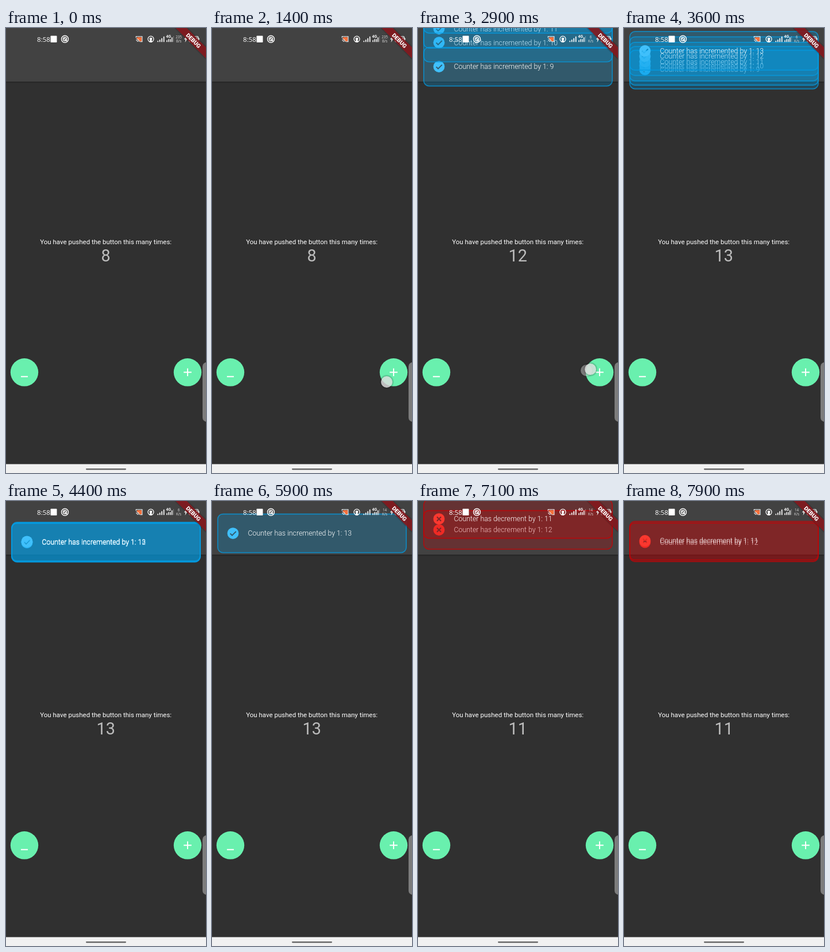
An HTML page for the animation above (8 s loop, 348 by 772 pixels).

```html
<!DOCTYPE html>
<html lang="en">
<head>
<meta charset="utf-8">
<title>Counter</title>
<style>
html, body { margin: 0; width: 100%; height: 100%; overflow: hidden; background: #303030; }
svg { display: block; width: 348px; height: 772px; font-family: Roboto, sans-serif; }
.line { fill: none; stroke: #fff; }
.up { --fill: #039be2; --icon: #40c0fb; }
.down { --fill: #c90004; --icon: #fb382f; }
.box { fill: var(--fill); fill-opacity: .25; stroke: var(--fill); stroke-opacity: .75; stroke-width: 1.7; }
.icon { fill: var(--icon); }
.msg { fill: #fff; font-size: 12.3px; font-weight: 300; }
.net { font: 6.2px "Open Sans", sans-serif; fill: #ddd; text-anchor: middle; }
</style>
</head>
<body>
<svg viewBox="0 0 348 772">
  <defs>
    <linearGradient id="shade" x2="0" y2="1">
      <stop stop-color="#000" stop-opacity=".3"/><stop offset="1" stop-color="#000" stop-opacity="0"/>
    </linearGradient>
    <radialGradient id="halo">
      <stop offset=".7" stop-color="#000" stop-opacity=".3"/><stop offset="1" stop-color="#000" stop-opacity="0"/>
    </radialGradient>
    <!-- glyphs are cut out so the layers below show through -->
    <mask id="check" maskUnits="userSpaceOnUse" x="25" y="60" width="24" height="24">
      <rect x="25" y="60" width="24" height="24" fill="#fff"/>
      <path d="M31.7 71.8l3.3 3.3 6.8-6.8" fill="none" stroke="#000" stroke-width="2"/>
    </mask>
    <mask id="cross" maskUnits="userSpaceOnUse" x="25" y="60" width="24" height="24">
      <rect x="25" y="60" width="24" height="24" fill="#fff"/>
      <path d="M32.9 67.9l7.2 7.2m0-7.2l-7.2 7.2" stroke="#000" stroke-width="2"/>
    </mask>
    <g id="touch">
      <circle r="13" fill="url(#halo)"/>
      <circle r="10" fill="#f4f4f4" fill-opacity=".75"/>
    </g>
  </defs>

  <rect width="348" height="772" fill="#303030"/>
  <rect width="348" height="93" fill="#424242"/>
  <rect y="93" width="348" height="3" fill="url(#shade)"/>

  <text x="173.7" y="375.4" font-size="11.5" fill="#fff" text-anchor="middle">You have pushed the button this many times:</text>
  <text id="count" x="173.7" y="404.6" font-size="28.8" fill="#bdbdbd" text-anchor="middle">8</text>

  <g fill="#69f0ae">
    <circle cx="32" cy="597.3" r="24.2"/>
    <circle cx="316" cy="597.3" r="24.2"/>
  </g>
  <path class="line" stroke-width="1.9" d="M26 604.8h12M309.2 597.3h13.6M316 590.5v13.6"/>

  <g id="toasts"></g>

  <g id="status" fill="#fff">
    <text x="54" y="23.8" font-size="11.6" style="font-family:'Open Sans',sans-serif">8:58</text>
    <rect x="77.5" y="13.5" width="11" height="11.5" rx="1"/>
    <circle class="line" cx="102.5" cy="19.3" r="6" stroke-width="1.4"/>
    <circle class="line" cx="102.5" cy="19.3" r="3" stroke-width="1.5"/>
    <path class="line" stroke-width="1.5" d="M101 17.5l5 5.5"/>
    <path fill="#f4703c" d="M228 16h8v7h-4l-4-4z"/>
    <path class="line" stroke-width="1.1" d="M226.3 17v-2.2h10.6v9h-4M226.3 18.7a5.2 5.2 0 0 1 5.2 5.2M226.3 21.2a2.7 2.7 0 0 1 2.7 2.7"/>
    <circle class="line" cx="252" cy="19.2" r="5" stroke-width="1.3"/>
    <circle cx="252" cy="18.8" r="2.4"/>
    <path d="M250.7 20h2.6l.8 5h-4.2z"/>
    <path class="line" stroke-width="1.7" d="M264.3 24.2v-2M267.7 24.2v-4M271.2 24.2v-6.5M274.7 24.2v-9.5"/>
    <path class="line" stroke-width="1.5" d="M280 24.2v-3M283 24.2v-5M286 24.2v-5M288.8 24.2v-8"/>
    <path class="line" stroke-width="1" stroke-opacity=".35" d="M291.5 24.2v-10"/>
    <text x="278.6" y="17" font-size="6.8" font-weight="700">4G</text>
    <text class="net" id="rate" x="300.5" y="18.3"></text>
    <text class="net" id="unit" x="300.5" y="25.3"></text>
    <path d="M314 13.5l-4 6.2h2.5l-1 5.3 4.2-6.8h-2.6z"/>
    <rect class="line" x="318.5" y="14.5" width="16" height="9.5" rx="2" stroke-width="1.2"/>
    <rect x="330" y="16.2" width="3.2" height="6.2"/>
    <rect x="335" y="17.5" width="1.4" height="3.6"/>
  </g>

  <g transform="translate(348) rotate(45)">
    <rect x="-60" y="22" width="120" height="17" fill="#000" opacity=".15"/>
    <rect x="-60" y="23.7" width="120" height="13.6" fill="#86191e" fill-opacity=".9"/>
    <text x="0" y="34.4" font-size="9.9" font-weight="900" fill="#fff" text-anchor="middle">DEBUG</text>
  </g>

  <rect x="342" y="580" width="20" height="103" rx="7" fill="#7c7c7c"/>
  <rect y="756.6" width="348" height="16" fill="#f1f1f1"/>
  <rect x="139" y="764.2" width="70" height="2.2" rx="1.1" fill="#5c5c5c"/>

  <use id="trail" href="#touch" opacity=".5"/>
  <use id="dot" href="#touch"/>
</svg>
<script>
const LOOP = 8000, SLIDE = 1900, LIFE = 3000, TRAVEL = 105, REST = .6;
const $ = id => document.getElementById(id);

// start, new count, step, lifetime
const toasts = [
  [1690, 9, 1, 2650], [2453, 10, 1], [2667, 11, 1], [2850, 12, 1], [2985, 13, 1],
  [6330, 12, -1], [6590, 11, -1]
].map(([start, n, step, life = LIFE]) => ({ start, n, step, life }));

// from, to, x, y, drift
const taps = [
  [1400, 1650, 304, 614, 0], [2330, 2450, 303, 600, 0], [2550, 2660, 301, 596, 0],
  [2730, 2830, 300, 594, 0], [2870, 2990, 300, 592, 7],
  [6200, 6320, 30, 606, 0], [6460, 6580, 31, 605, 0]
];
const rates = [[0, "235", "B/s"], [2300, "6", "K/s"], [5000, "14", "K/s"]];

$("toasts").innerHTML = toasts.map(({ n, step }) => {
  const up = step > 0;
  return `<g class="${up ? "up" : "down"}">
    <rect class="box" x="10" y="38" width="328" height="67" rx="9"/>
    <circle class="icon" cx="36.5" cy="71.5" r="9.9" mask="url(#${up ? "check" : "cross"})"/>
    <text class="msg" x="62.6" y="75.8">Counter has ${up ? "incremented" : "decrement"} by 1: ${n}</text></g>`;
}).join("");
toasts.forEach((toast, i) => toast.el = $("toasts").children[i]);

const show = (el, on) => el.style.display = on ? "" : "none";
const place = (el, x, y) => el.setAttribute("transform", `translate(${x} ${y})`);
const latest = (list, test) => list.filter(test).pop();

// slide in, then run the same curve backwards
function offset(age) {
  const u = age < SLIDE ? age / SLIDE : 2 - age / SLIDE;
  return REST - TRAVEL * (1 - u) ** 3;
}

function draw(t) {
  for (const { el, start, life } of toasts) {
    const age = t - start, on = age >= 0 && age < life;
    show(el, on);
    if (on) place(el, 0, offset(age));
  }
  const last = latest(toasts, a => a.start - 30 <= t);
  $("count").textContent = last ? last.n : 8;

  const [, rate, unit] = latest(rates, r => r[0] <= t);
  $("rate").textContent = rate;
  $("unit").textContent = unit;

  const tap = taps.find(([from, to]) => t >= from && t < to);
  show($("dot"), tap);
  show($("trail"), tap && tap[4]);
  if (tap) {
    place($("dot"), tap[2], tap[3]);
    place($("trail"), tap[2] - tap[4], tap[3] + 2);
  }
}

const origin = performance.now();
function tick() {
  draw((performance.now() - origin) % LOOP);
  requestAnimationFrame(tick);
}
tick();
</script>
</body>
</html>
```
